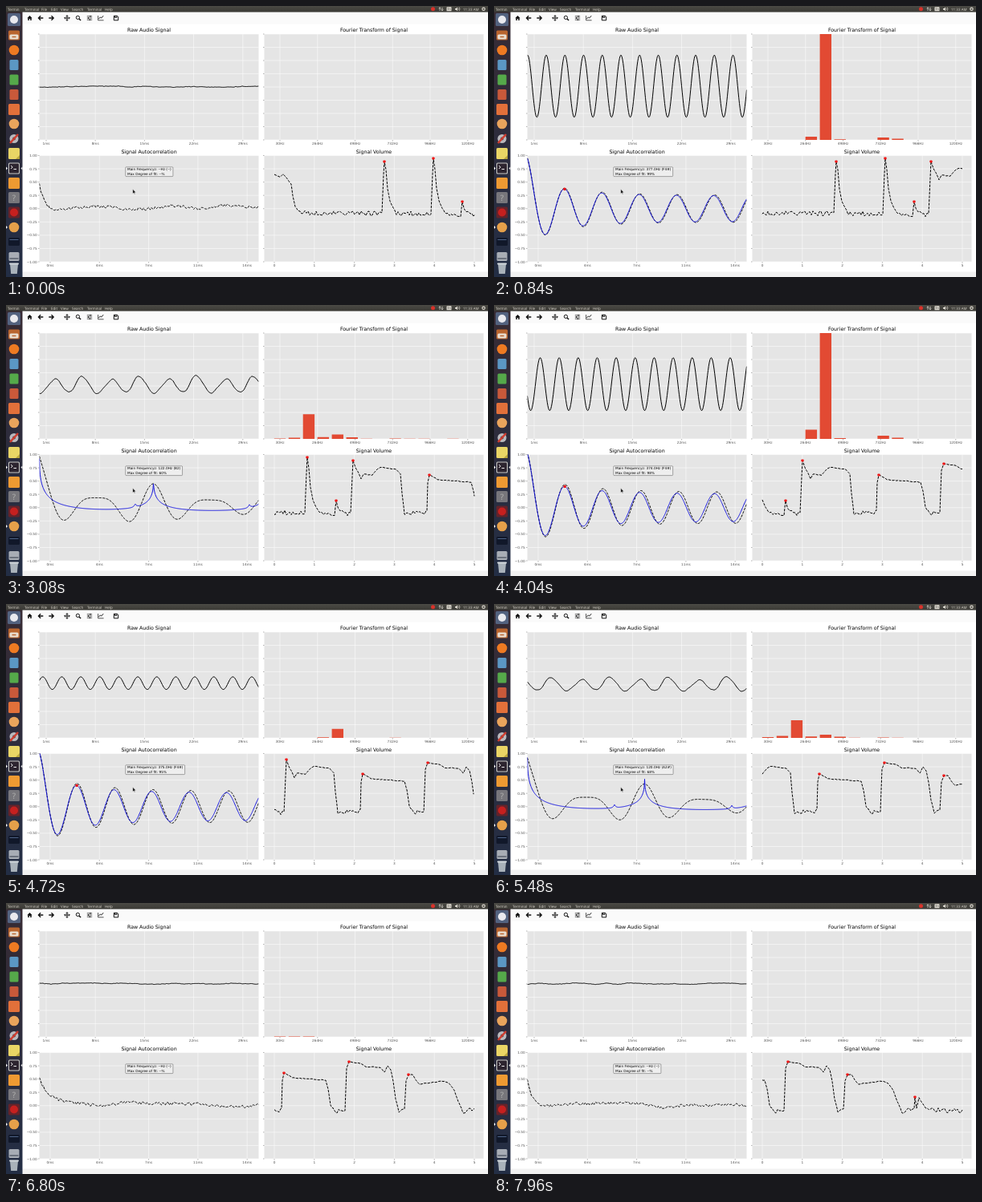
Write an HTML page that moves like this. It is 600 px wide and 338 px high and loops after 8000 ms.

```html
<!DOCTYPE html>
<html lang="en">
<head>
<meta charset="utf-8">
<title>Audio monitor</title>
<style>
  html, body { margin: 0; width: 100%; height: 100%; overflow: hidden; background: #fff; }
  svg { display: block; width: 600px; height: 338px; }
  text { font-family: "DejaVu Sans", sans-serif; font-size: 4.25px; text-rendering: geometricPrecision; }
  .menu text { font-family: "Open Sans", sans-serif; font-size: 4.5px; fill: #dfdbd2; }
  .tick { fill: #555; }
  .title { font-size: 6.25px; text-anchor: middle; }
  .mid { text-anchor: middle; }
  .end { text-anchor: end; }
  .line { fill: none; stroke: #000; stroke-width: 1; stroke-linejoin: round; }
  .dash { stroke-dasharray: 3.2 1.4; }
  .blue { stroke: #1414dc; }
  .tool { fill: none; stroke: #111; stroke-width: 1; }
</style>
</head>
<body>
<svg id="stage" viewBox="0 0 600 338">
  <defs>
    <linearGradient id="side" x2="0" y2="1">
      <stop offset="0" stop-color="#372b34"/><stop offset="1" stop-color="#232e45"/>
    </linearGradient>
    <linearGradient id="top" x2="0" y2="1">
      <stop offset="0" stop-color="#4b4a45"/><stop offset="1" stop-color="#3a3934"/>
    </linearGradient>
  </defs>
  <rect width="600" height="338" fill="#fff"/>
  <rect x="20" y="7" width="580" height="15.5" fill="#fafafa"/>
  <rect x="20" y="331.5" width="580" height="7" fill="#f1f1f1"/>
  <rect y="7" width="20.5" height="331" fill="url(#side)"/>
  <g id="menu" class="menu">
    <rect width="600" height="7.6" fill="url(#top)"/>
    <circle cx="531.5" cy="3.8" r="2.5" fill="#d8322a"/>
    <path d="M540 5.8V1.8m-1.2 1.4 1.2-1.4 1.2 1.4M543 1.8v4m-1.2-1.4 1.2 1.4 1.2-1.4" fill="none" stroke="#dfdbd2" stroke-width=".8"/>
    <rect x="548.5" y="1.3" width="6" height="5" rx=".6" fill="#dfdbd2"/>
    <text x="549.4" y="5.3" style="fill:#3c3b37;font-size:3.8px">En</text>
    <path d="M559 3h1.3l1.7-1.5v4.8L560.300 4.800H559z" fill="#dfdbd2"/>
    <path d="M563 2.3q1 1.500 0 3M564.200 1.500q1.600 2.300 0 4.600" fill="none" stroke="#dfdbd2" stroke-width=".6"/>
    <circle cx="594.5" cy="3.8" r="1.7" fill="none" stroke="#dfdbd2" stroke-width="1.1"/>
  </g>
  <g id="dock"></g>
  <g class="tool">
    <path d="M26.300 15.200 29.500 12l3.200 3.200h-1v2.800h-1.500v-2h-1.400v2h-1.500v-2.800z" fill="#111" stroke="none"/>
    <path d="M46.300 15H40.500m2.600-2.700L40.400 15l2.700 2.700M53.300 15h5.800m-2.600-2.700L59.200 15l-2.700 2.700" stroke-width="1.3"/>
    <path d="M72.700 15h6.600M76 11.700v6.600M73.900 13.800 72.700 15l1.200 1.200m4.200-2.400 1.200 1.200-1.200 1.200M74.800 12.900 76 11.700l1.200 1.200m-2.400 4.200 1.200 1.200 1.200-1.200"/>
    <circle cx="89.400" cy="14.400" r="2.100"/><path d="m91 16 2.100 2.100" stroke-width="1.400"/>
    <path d="M100.800 12.800h6.400M100.800 15h6.400M100.800 17.200h6.400" stroke-width=".7"/>
    <path d="M105 11.900v1.800M102.500 14.100v1.800M104.300 16.300v1.800"/>
    <path d="M114.600 12v5.800h7" stroke-width=".7"/><path d="m115.400 16 2-2 1.200 1 2.600-2.800"/>
    <path d="M134.300 12.300h4.200l1.200 1.200v4.300h-5.400zM135.500 12.500v1.800h2.500v-1.800"/>
  </g>
  <g id="plots"></g>
</svg>
<script>
const $ = id => document.getElementById(id);
const plots = $('plots');

function add(parent, tag, attrs = {}, text = '') {
  const node = document.createElementNS('http://www.w3.org/2000/svg', tag);
  for (const k in attrs) node.setAttribute(k, attrs[k]);
  node.textContent = text;
  parent.append(node);
  return node;
}
const label = (x, y, text, cls, parent = plots) => add(parent, 'text', { x, y, class: cls }, text);
const clamp = v => Math.max(0, Math.min(1, v));
const hash = (n, seed) => {
  const v = Math.sin(n * 127.1 + seed * 311.7) * 43758.5453;
  return v - Math.floor(v);
};
// Value noise in -0.5..0.5
function noise(x, seed) {
  const i = Math.floor(x), f = x - i;
  return hash(i, seed) * (1 - f) + hash(i + 1, seed) * f - 0.5;
}
function lerp(points, x) {
  let i = 1;
  while (i < points.length - 1 && points[i][0] < x) i++;
  const [x0, y0] = points[i - 1], [x1, y1] = points[i];
  return y0 + (y1 - y0) * (x - x0) / (x1 - x0);
}

// Menu bar
[[2, 'Termin'], [23, 'Terminal'], [44, 'File'], [56, 'Edit'], [68, 'View'], [82, 'Search'],
 [101, 'Terminal'], [123, 'Help'], [569, '11:33 AM']].forEach(([x, s]) => label(x, 5.5, s, '', $('menu')));

// Launcher
const dock = $('dock');
const disc = (y, fill, r = 6.3) => add(dock, 'circle', { cx: 10, cy: y, r, fill });
const tile = (y, fill, w = 14, h = w, rx = 1.5) =>
  add(dock, 'rect', { x: 10 - w / 2, y: y - h / 2, width: w, height: h, rx, fill });
tile(17, '#53627f', 16); disc(17, '#e9e9ee', 5);
tile(36.5, '#b9652f', 14, 12); tile(38.5, '#eadfd2', 11, 6); tile(38.5, '#b9652f', 5, 1.5, 0);
disc(55, '#ee7a22');
tile(73.5, '#5b97c4', 11, 13); tile(92, '#55a94a', 11, 13); tile(110.5, '#c9593a', 11, 13);
tile(129, '#e2703a');
disc(147, '#e9a45c');
disc(165.5, '#b9b9bd', 5.5); disc(165.5, '#4c4650', 2);
add(dock, 'path', { d: 'M5 171 15 160', stroke: '#cf3d30', 'stroke-width': 2.6 });
tile(184, '#e9d565'); add(dock, 'path', { d: 'M17 186v5h-5z', fill: '#b9a53c' });
tile(202.5, '#c8c8c4'); tile(202.5, '#2d2530', 12, 12, 1);
add(dock, 'path', { d: 'm6 199 2.200 2-2.200 2M9.500 203.500h3.500', fill: 'none', stroke: '#fff', 'stroke-width': 0.9 });
tile(221, '#ee9a32');
tile(239, '#77767b'); add(dock, 'text', { x: 10, y: 242.500, class: 'mid', fill: '#aaa', style: 'font-size:10px' }, '?');
tile(257.5, '#65232a'); disc(257.5, '#c5201f', 5);
disc(276, '#e5a04a');
tile(294, '#11182a', 14, 10); tile(291.5, '#4d6285', 11, 1, 0);
tile(312.5, '#a8adb5', 13, 11); tile(315, '#6b727d', 11, 2, 0.5);
add(dock, 'path', { d: 'M5 322h10l-1.200 12H6.200z', fill: '#a9b2ba' });
tile(321.5, '#d3d9dd', 12, 2, 1);
add(dock, 'path', { d: 'M0 200.500 2 202.500 0 204.500zM0 274 2 276 0 278zM20.500 200.500l-2 2 2 2z', fill: '#eee' });

// Axes
function panel(id, x, y, title, ticks, yLabels) {
  const w = 273, h = y < 100 ? 132 : 132.5, bottom = y + h;
  add(plots, 'rect', { x, y, width: w, height: h, fill: '#e5e5e5' });
  let grid = '', marks = '';
  ticks.forEach(([tx, s]) => {
    grid += `M${tx} ${y}v${h}`;
    marks += `M${tx} ${bottom}v1.500`;
    label(tx, bottom + 6, s, 'tick mid');
  });
  for (let i = 0; i <= 8; i++) {
    const ty = y + h * i / 8, v = 1 - i / 4;
    grid += `M${x} ${ty}h${w}`;
    marks += `M${x} ${ty}h-1.500`;
    if (yLabels) label(x - 2.8, ty + 1.6, (v < 0 ? '−' : '') + Math.abs(v).toFixed(2), 'tick end');
  }
  add(plots, 'path', { d: grid, stroke: '#fff', 'stroke-width': 0.5 });
  add(plots, 'path', { d: marks, stroke: '#555', 'stroke-width': 0.45 });
  label(x + w / 2, y - 2.8, title, 'title');
  const clip = add(plots, 'clipPath', { id });
  add(clip, 'rect', { x, y, width: w, height: h });
  return add(plots, 'g', { 'clip-path': `url(#${id})` });
}
const ticks = (x, step, names) => names.split(' ').map((s, i) => [x + i * step, s]);
const L = 41.5, R = 314.5;
const rawBox = panel('a', L, 35, 'Raw Audio Signal', ticks(50, 61.2, '1ms 8ms 15ms 22ms 29ms'));
const freqBox = panel('b', 321.5, 35, 'Fourier Transform of Signal', ticks(341, 46.75, '30Hz 264Hz 498Hz 732Hz 966Hz 1200Hz'));
const corrBox = panel('c', L, 186.5, 'Signal Autocorrelation', ticks(55, 61.3, '0ms 4ms 7ms 11ms 14ms'), true);
const volBox = panel('d', 321.5, 186.5, 'Signal Volume', ticks(334, 49.8, '0 1 2 3 4 5'));

const rawLine = add(rawBox, 'path', { class: 'line' });
const barPath = add(freqBox, 'path', { fill: '#e24a33' });
const corrLine = add(corrBox, 'path', { class: 'line dash' });
const fitLine = add(corrBox, 'path', { class: 'line blue' });
const volLine = add(volBox, 'path', { class: 'line dash' });
const dot = parent => add(parent, 'rect', { width: 3.2, height: 3.2, rx: 0.8, fill: '#f01515' });
const place = (node, x, y, on) => {
  node.setAttribute('x', x - 1.6);
  node.setAttribute('y', y - 1.6);
  node.setAttribute('visibility', on ? 'visible' : 'hidden');
};
const fitDot = dot(corrBox);
const tip = add(plots, 'rect', { x: 148.8, y: 200.8, height: 11.8, rx: 0.9, fill: '#eee', stroke: '#333', 'stroke-width': 0.4 });
const tipTop = label(151, 205.4, ''), tipLow = label(151, 210.5, '');
const cursor = add(plots, 'path', {
  d: 'M157.700 228.300v6l1.400-1.200.9 1.900.9-.4-.9-1.900h1.900z', fill: '#111', stroke: '#fff', 'stroke-width': 0.5 });

// Sounds: raw level is sustain + hit * decay; key is the time the given values hold
const sounds = [
  { from: 80, to: 1260, key: 840, hz: 377, name: 'F4#', fit: 99, period: 23.25, peak: 65, mid: 100,
    sustain: 37, hit: 8, fall: 500, bars: [0, 0, 0, 4, 200, 0.7, 0, 0, 3, 1.5], lag: 46.4, stretch: 1.005, gain: 1 },
  { from: 1890, to: 3080, key: 2000, hz: 123, name: 'B2', fit: 61, period: 71, peak: 47, mid: 100, low: true,
    sustain: 14, hit: 10, fall: 500, bars: [2.2, 6, 119, 9, 21, 8, 0.7, 0, 1.5, 0.6, 0.6, 0.3, 0.5], lag: 142.1, spur: 0.84, gain: 1 },
  { from: 3480, to: 4640, key: 4040, hz: 374, name: 'F4#', fit: 98, period: 23.65, peak: 57.5, mid: 98.7,
    sustain: 31, hit: 8, fall: 400, bars: [0, 0, 0, 11.5, 200, 1, 0, 0, 4, 1.5], lag: 46.6, stretch: 1.012, gain: 1.08 },
  { from: 4955, to: 6250, key: 5480, hz: 120, name: 'A2#', fit: 68, period: 72.9, peak: 72, mid: 100.7, low: true,
    sustain: 7.5, hit: 20, fall: 220, bars: [1, 2.5, 22, 1.7, 4, 1.5, 0.3, 0, 0.4, 0.3], lag: 146, spur: 0.743, gain: 0.95 }
];
const level = (s, t) => s.sustain + s.hit * Math.exp(-(t - s.from) / s.fall);
const TAU = 2 * Math.PI, { cos, exp, sin, sqrt, abs, round } = Math;

const wave = (s, p) => s.low
  ? 0.8 * cos(2 * TAU * p) + 0.18 * cos(TAU * (p + 0.105)) + 0.09 * cos(3 * TAU * p + 1) + 0.06 * cos(5 * TAU * p + 2)
  : cos(TAU * p);

// Measured autocorrelation (dashed) at distance d from zero lag
function measured(s, d) {
  if (!s.low) return fitted(s, d / s.stretch) * (1 + (s.stretch - 1) * 10 * clamp(d / 60));
  const a = TAU * d / s.lag;
  const body = 0.2675 * cos(2 * a) + 0.015 * cos(a) + 0.1175 * cos(3 * a);
  return s.gain * (0.05 + body * exp(-Math.max(0, d - s.lag) / 200) + 0.52 * exp(-d / 10));
}
// Ideal curve for the detected pitch (blue)
function fitted(s, d) {
  if (!s.low) {
    return s.gain * (0.24 + 0.26 * exp(-d / 60) + 0.45 * exp(-d / 12)) * cos(TAU * d / s.lag);
  }
  const cusp = n => 0.6 * exp(-0.4 * sqrt(abs(d - n * s.lag)));
  const spur = n => 0.06 * exp(-abs(d - (n + s.spur) * s.lag) / 1.8);
  return exp(-0.36 * sqrt(d)) * 1.02 + cusp(1) + cusp(2) + spur(0) + spur(1) - 0.1;
}

// Volume history, in stage pixels at time zero
const pluck = (x, top) => [[x - 3, 259], [x - 1, 210], [x, top], [x + 2, 204], [x + 4, 228],
  [x + 7, 243], [x + 11, 252], [x + 16, 259]];
const volume = [
  [334, 210], [341, 213], [345, 210], [349, 214], [355, 222], [357, 237], [360, 250], [365, 258],
  ...pluck(471, 194), ...pluck(532, 190),
  [566, 260], [568, 244], [570, 252], [573, 259], [586, 261], [588, 215], [589, 194], [592, 203],
  [595, 208], [599, 217], [602, 211], [613, 212], [618, 206], [623, 202], [643, 205], [648, 211],
  [650, 235], [653, 259], [681, 259], [682, 222], [684, 212], [695, 218], [736, 221], [739, 232],
  [742, 252], [746, 260], [760, 258], [762, 206], [765, 198], [779, 200], [786, 204], [804, 205],
  [809, 211], [813, 203], [817, 208], [820, 222], [823, 245], [827, 259], [834, 259], [836, 222],
  [839, 214], [844, 214], [848, 221], [853, 226], [882, 222], [890, 225], [896, 234], [901, 248],
  [907, 260], [922, 258], [923, 242], [925, 256], [928, 243], [933, 251], [938, 258], [995, 260]
];
const volAt = w => {
  const y = lerp(volume, w);
  return y + noise(w / 2, 7) * (y > 256 ? 6 : 1);
};
const onsets = [471, 532, 568, 589, 684, 765, 839, 923].map(w => ({ w, y: lerp(volume, w), node: dot(volBox) }));
const scroll = [[0, 0], [840, 45], [2000, 103], [4040, 205], [5480, 279], [6800, 338], [7960, 399]];

function trace(from, to, step, fn) {
  let d = '';
  for (let x = from; x <= to; x += step) d += `${d ? 'L' : 'M'}${x.toFixed(2)} ${fn(x).toFixed(2)}`;
  return d;
}
const setPath = (node, d) => node.setAttribute('d', d);

function draw(t) {
  if (t > 4960 && t < 5160) t = 4960;
  const frame = t / 40;
  const s = sounds.find(n => t > n.from && t < n.to + 120);
  const gate = s ? clamp((t - s.from) / 80) * clamp((s.to + 120 - t) / 160) : 0;
  const on = gate > 0.15;

  // Raw signal
  const amp = s ? level(s, t) * gate : 0;
  const shift = s ? (frame - s.key / 40) * 0.382 : 0;
  setPath(rawLine, trace(L, R, 0.75, x => {
    const hiss = 1.8 * noise(x / 14, frame) + 0.8 * noise(x / 2, frame + 0.3);
    if (!on) return 100.6 + hiss;
    return s.mid - amp * wave(s, (x - s.peak) / s.period + shift) + (s.low ? hiss * 0.9 : 0);
  }));

  // Spectrum
  const click = t > 6700 && t < 6960;
  const bars = on ? s.bars : click ? [0.4, 0.5, 0.4] : [];
  const power = on ? (amp / level(s, s.key)) ** 2 : 1;
  setPath(barPath, bars.map((h, i) => `M${333.8 + i * 17.95} 167v${-h * power}h14.400V167z`).join(''));

  // Autocorrelation
  const toY = v => 252.75 - v * 66.25;
  const settle = t > 6300 && t < 7000 ? 13 : 6;
  setPath(corrLine, trace(L, R, on ? 0.5 : 1, x => {
    const d = x - L;
    if (on) return toY(measured(s, d));
    return 252 - 34 * exp(-d / settle) + 7 * noise(x / 30, frame + 0.7) + 4 * noise(x / 1.6, frame + 0.1);
  }));
  setPath(fitLine, on ? trace(L, R, 0.5, x => toY(fitted(s, x - L))) : '');
  const pitched = on && !s.low;
  place(fitDot, pitched ? L + s.lag : 0, pitched ? toY(fitted(s, s.lag)) : 0, pitched);

  // Readout
  const hz = on ? (s.hz + round(1.4 * sin((t - s.key) / 300))).toFixed(1) : '--';
  const fit = on ? s.fit - round(3 * abs(sin((t - s.key) / 400))) : '--';
  tipTop.textContent = `Main Frequencyz: ${hz}Hz (${on ? s.name : '--'})`;
  tipLow.textContent = `Max Degree of fit: ${fit}%`;
  tip.setAttribute('width', tipTop.getComputedTextLength() + 4.4);
  cursor.setAttribute('visibility', t < 6040 ? 'visible' : 'hidden');

  // Volume
  const off = lerp(scroll, t), left = 334 + off, right = 583 + off;
  const point = w => `${(w - off).toFixed(2)} ${volAt(w).toFixed(2)}`;
  let d = 'M' + point(left);
  for (let w = Math.ceil(left); w <= right; w++) d += 'L' + point(w);
  setPath(volLine, d);
  onsets.forEach(o => place(o.node, o.w - off, o.y, o.w >= left && o.w <= right));
}

const start = performance.now();
let last = -1;
function tick() {
  const t = Math.floor((performance.now() - start) % 8000 / 40) * 40;
  if (t !== last) draw(last = t);
  requestAnimationFrame(tick);
}
tick();
</script>
</body>
</html>
```
